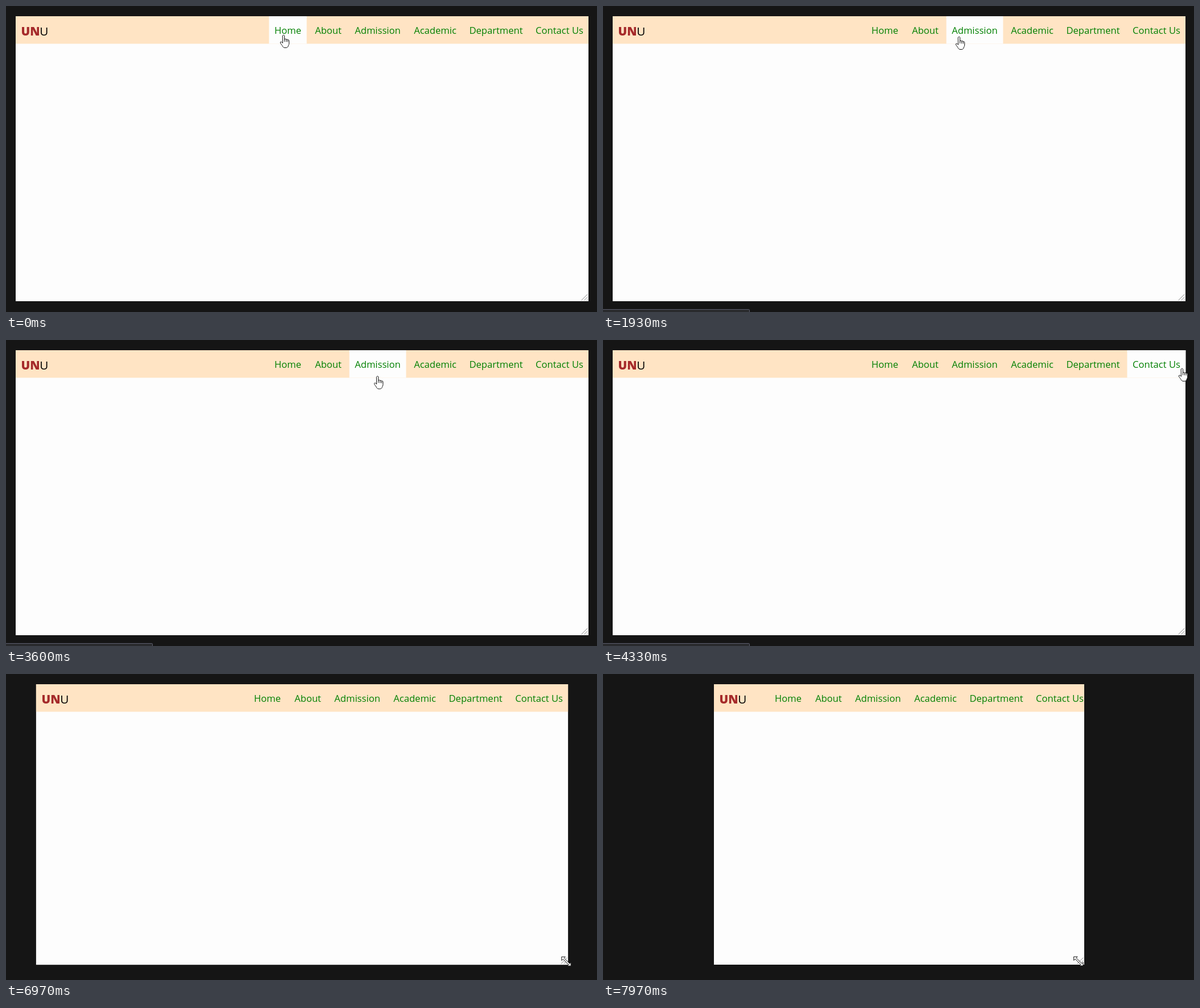
Animation, 1039 px wide and 539 px high, one loop 8000 ms. Source, as an HTML page:

```html
<!DOCTYPE html>
<html lang="en">
<head>
<meta charset="utf-8">
<title>Responsive navigation bar</title>
<style>
  html, body { margin: 0; width: 100%; height: 100%; overflow: hidden; background: #151515; }
  svg { display: block; width: 100vw; height: 100vh; }
  text { font-family: "Open Sans", "Noto Sans", sans-serif; }
  .link { font-size: 16.6px; fill: #008000; text-anchor: middle; }
  .logo { font-size: 20.8px; }
  .cursor { fill: #fff; stroke: #111; stroke-width: 1; stroke-linejoin: round; stroke-linecap: round; }
</style>
</head>
<body>
<svg viewBox="0 0 1039 539">
  <rect width="1039" height="539" fill="#151515"/>
  <rect id="page" y="18" fill="#fdfdfd"/>
  <rect id="header" y="18" height="48.5" fill="#ffe4c4"/>
  <g id="brand">
    <text class="logo" x="9.5" y="52" font-weight="800" fill="#a52a2a">UN</text>
    <text class="logo" x="42.3" y="52">U</text>
  </g>
  <g id="nav"><rect id="hover" y="18" height="48.5" fill="#fdfdfd"/></g>
  <path id="grip" d="M-12.5 -1.5 L-1.5 -12.5 M-7.5 -1.5 L-1.5 -7.5 M-3 -1.5 L-1.5 -3" fill="none" stroke="#8a8a8a"/>
  <rect id="status" x="-1" y="534.5" width="258.5" height="8" rx="1" fill="#292a2d" stroke="#5f6070"/>
  <g id="hand" class="cursor">
    <path d="M-1.8 1.6 C-1.8 -.3 1.6 -.3 1.6 1.6 V8 C2 6.4 4.5 6.6 4.6 8.3 C5 7 7.3 7.4 7.3 9 C7.9 8 9.7 8.6 9.7 10.2 V15 C9.7 17 8.2 18.3 8 20 C7.4 21.8 5.8 22.5 4 22.5 H2 C.2 22.5 -1.2 21.3 -1.8 19.8 C-2.5 18 -4.6 16.2 -5.6 14 C-6.3 12.3 -4.4 11.4 -3.2 12.6 L-1.8 14 Z"/>
    <path d="M1.6 8 V11.5 M4.6 8.5 V11.8 M7.3 9.2 V12" fill="none"/>
  </g>
  <path id="arrow" class="cursor" d="M.5 .5 V16 L4 12.6 L6.5 18.3 L9 17.2 L6.5 11.7 H11.3 Z"/>
  <path id="resize" class="cursor" d="M-8 -8 H-1.8 L-4 -5.8 L5.8 4 L8 1.8 V8 H1.8 L4 5.8 L-5.8 -4 L-8 -1.8 Z"/>
</svg>
<script>
const DURATION = 8000;
const GRAB = 6970, DRAG = 7330, DRAG_END = 7970;
const STATUS_DELAY = 100;
const FULL = { left: 17, right: 1024, bottom: 520 };
const TOP = 18, HEADER_BOTTOM = 66.5, LINK_PADDING = 9.6;

const $ = id => document.getElementById(id);
const mix = (a, b, u) => a + (b - a) * u;
const ramp = (t, from, to) => Math.min(1, Math.max(0, (t - from) / (to - from)));
const smooth = u => u * u * (3 - 2 * u);

// text centres at full width
const centres = {
  Home: 495.5, About: 566.5, Admission: 653.5, Academic: 754.5, Department: 861.5, "Contact Us": 973
};

// the pointer rests between moves; a swing carries it sideways on the way
const home = { x: 488, y: 51 };
const moves = [
  { from: 30, to: 830, x: 663, y: 49, swing: 430 },
  { from: 870, to: 900, x: 679, y: 49 },
  { from: 1070, to: 1330, x: 712, y: 49 },
  { from: 1500, to: 1670, x: 862, y: 49 },
  { from: 1830, to: 1930, x: 626, y: 54 },
  { from: 1930, to: 3030, x: 644, y: 73, swing: 270 },
  { from: 3030, to: 4330, x: 1018, y: 50, swing: -150 },
  { from: 4700, to: 5230, x: 860, y: 50 },
  { from: 5600, to: 6130, x: 1019, y: 515 }
];

function roam(t) {
  let { x, y } = home;
  for (const { from, to, swing = 0, ...goal } of moves) {
    const u = smooth(ramp(t, from, to));
    x = mix(x, goal.x, u) + swing * Math.sin(Math.PI * u);
    y = mix(y, goal.y, u);
  }
  return { pointer: { x, y }, ...FULL, overflow: 0 };
}

// the page stays centred and its corner trails the pointer
function drag(t) {
  const settle = ramp(t, GRAB, GRAB + 30);
  const u = ramp(t, DRAG, DRAG_END);
  const left = mix(53, 50, settle) + 145 * u ** 1.065;
  const x = mix(985, 990, settle) - 154 * u ** 0.855;
  const y = 506 + 6 * settle * (1 - u) ** 8;
  return {
    pointer: { x, y }, left, right: FULL.left + FULL.right - left,
    bottom: y + 6, overflow: 8 * u ** 0.7
  };
}

function setAttrs(node, attrs) {
  for (const name in attrs) node.setAttribute(name, attrs[name]);
}

function place(id, x, y) {
  setAttrs($(id), { transform: `translate(${x} ${y})` });
}

function show(id, visible) {
  $(id).style.display = visible ? "" : "none";
}

const links = Object.entries(centres).map(([label, x]) => {
  const text = document.createElementNS("http://www.w3.org/2000/svg", "text");
  setAttrs(text, { class: "link", x, y: 49 });
  text.textContent = label;
  $("nav").append(text);
  const half = text.getComputedTextLength() / 2 + LINK_PADDING;
  return { x: x - half, width: 2 * half };
});

function render(t) {
  const { pointer, left, right, bottom, overflow } = t < GRAB ? roam(t) : drag(t);
  const { x, y } = pointer;
  const width = right - left;
  setAttrs($("page"), { x: left, width, height: bottom - TOP });
  setAttrs($("header"), { x: left, width });
  place("brand", left, 0);
  place("nav", right - FULL.right + overflow, 0);
  place("grip", right, bottom);

  const overHeader = y >= TOP && y < HEADER_BOTTOM;
  const link = overHeader && links.find(l => x >= l.x && x <= l.x + l.width);
  if (link) setAttrs($("hover"), link);
  show("hover", link);
  show("status", link && t > STATUS_DELAY);

  const resizing = x > right - 24 && y > bottom - 16;
  const cursor = link ? "hand" : resizing ? "resize" : "arrow";
  for (const id of ["hand", "arrow", "resize"]) show(id, id === cursor);
  place(cursor, x, y);
}

const start = performance.now();
function tick() {
  render((performance.now() - start) % DURATION);
  requestAnimationFrame(tick);
}
tick();
</script>
</body>
</html>
```
